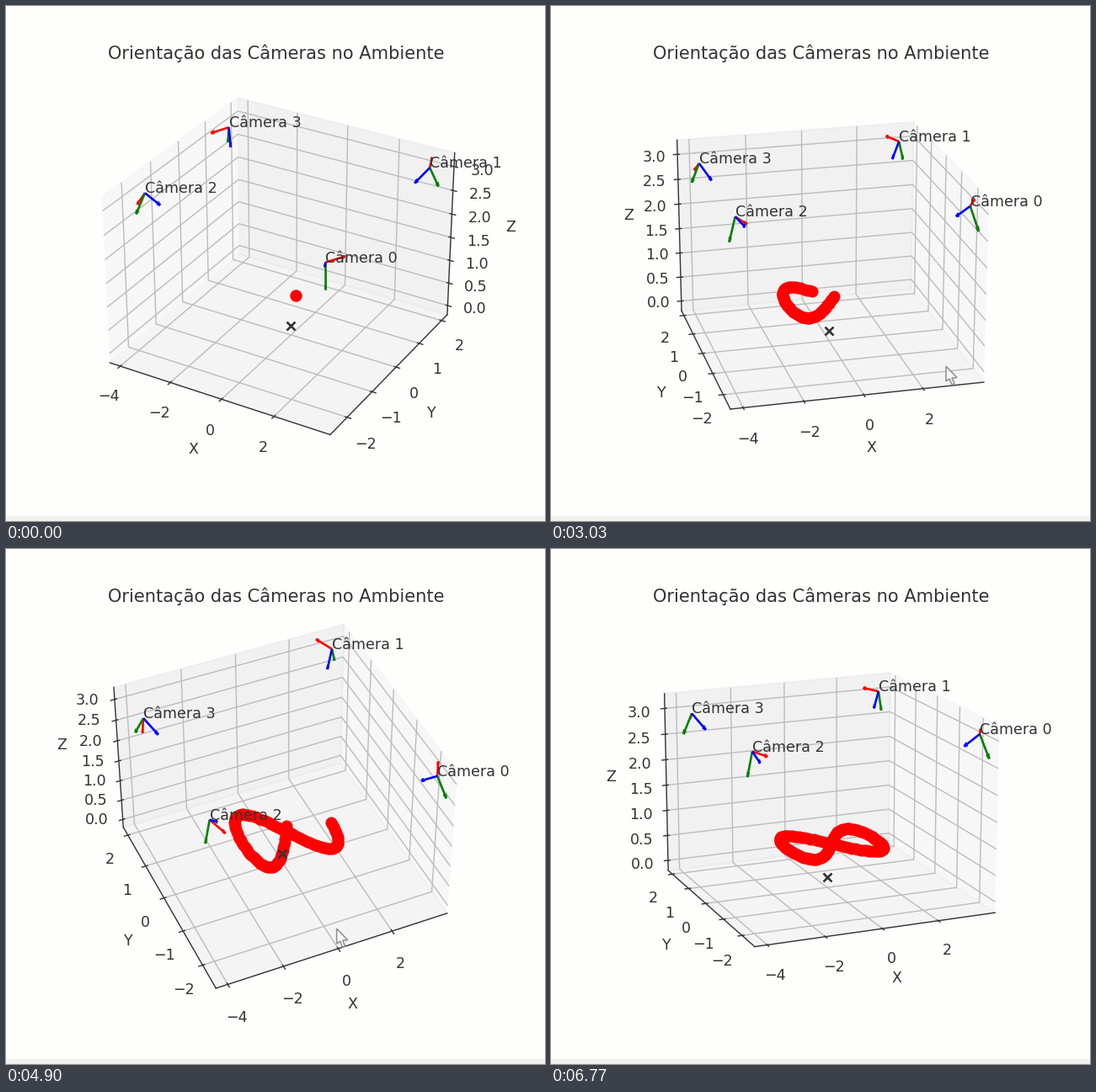
Write a matplotlib script that moves like this. It is 640 px wide and 612 px high and loops after 6810 ms.

```python
import numpy as np
import matplotlib.pyplot as plt
from matplotlib.animation import FuncAnimation
from matplotlib.patches import Polygon, Rectangle

W, H, DPI = 640, 612, 126
LOOP, STEP = 6810, 30
SIDE = 465.7
INK = "#333333"

plt.rcParams.update({
    "font.family": "DejaVu Sans",
    "grid.color": "#bcbcc0",
    "text.color": INK,
    "axes.labelcolor": INK,
    "xtick.color": INK,
    "ytick.color": INK,
    "axes.edgecolor": INK,
})

# time, elevation, azimuth, path angle, pointer x, pointer y
POSES = np.array([
    (700, 30, -60, -5, 660, 620),
    (1300, 29, -64.3, 25, 365, 452),
    (2100, 27, -82.8, 91, 408, 437),
    (3030, 21, -104.2, 162, 469, 428),
    (4470, 36.4, -131.6, 225, 437, 453),
    (5400, 46.5, -90.5, 316, 344, 445),
    (6400, 16, -112.8, 355, 660, 380),
])
TIMES, VALUES = POSES[:, 0], POSES[:, 1:]


def slopes(ts, vs):
    """Harmonic-mean slopes, flat at turning points and at both ends."""
    d = np.diff(vs, axis=0) / np.diff(ts)[:, None]
    a, b = d[:-1], d[1:]
    same = a * b > 0
    inner = np.where(same, 2 * a * b / np.where(same, a + b, 1), 0)
    return np.pad(inner, ((1, 1), (0, 0)))


SLOPES = slopes(TIMES, VALUES)


def pose(t):
    """Smooth path through the poses, held before the first and after the last."""
    i = int(np.clip(np.searchsorted(TIMES, t, "right") - 1, 0, len(TIMES) - 2))
    span = TIMES[i + 1] - TIMES[i]
    u = np.clip((t - TIMES[i]) / span, 0, 1)
    v = 1 - u
    return (v * v * ((1 + 2 * u) * VALUES[i] + u * span * SLOPES[i])
            + u * u * ((1 + 2 * v) * VALUES[i + 1] - v * span * SLOPES[i + 1]))


def eight(deg):
    """Figure eight traced by the ball at a fixed height."""
    a = np.radians(deg)
    return 0.04 - 1.6 * np.sin(a), -0.14 - 0.82 * np.sin(2 * a), np.full(a.shape, 0.69)


def camera_axes(heading, pitch=33):
    """Right, down and forward directions."""
    h, p = np.radians([heading, pitch])
    ch, sh, cp, sp = np.cos(h), np.sin(h), np.cos(p), np.sin(p)
    return (sh, -ch, 0), (-ch * sp, -sh * sp, -cp), (ch * cp, sh * cp, -sp)


def stage(points):
    """Stage pixels, y down, to figure fractions."""
    return np.array(points) / (W, -H) + (0, 1)


fig = plt.figure(figsize=(W / DPI, H / DPI), dpi=DPI, facecolor="#fefefd")
ax = fig.add_axes([88.2 / W, 73.2 / H, SIDE / W, SIDE / H],
                  projection="3d", computed_zorder=False, facecolor="none")
# 3D axes lower the title to 92 % of the given height
ax.set_title("Orientação das Câmeras no Ambiente", y=1 / 0.92)

# position and heading of each camera
cameras = [((3.6, -2.41, 3.1), 136), ((3.41, 1.98, 3.0), 213),
           ((-3.83, -1.73, 3.04), 25), ((-3.93, 1.44, 3.05), -37)]
for n, (spot, heading) in enumerate(cameras):
    for direction, color in zip(camera_axes(heading), "rgb"):
        ax.quiver(*spot, *direction, length=0.5, color=color,
                  linewidth=1.5, arrow_length_ratio=0.2, zorder=4)
    ax.text(*spot, f"Câmera {n}", zorder=6)

trail, = ax.plot([], [], [], "o", color="red", ms=8, mew=0, zorder=3)
ax.plot([0], [0], [0], "x", color=INK, ms=6, mew=1.5, zorder=5)

ax.set(xlim=(-4.42, 4.08), ylim=(-2.66, 2.26), zlim=(-0.205, 3.285),
       xticks=range(-4, 3, 2), yticks=range(-2, 3), zticks=np.arange(0, 3.1, 0.5),
       xlabel="X", ylabel="Y", zlabel="Z")

fig.add_artist(Rectangle((0, 0), 1, 6 / H, transform=fig.transFigure,
                         facecolor="#f2f2ec", edgecolor="none"))
ARROW = np.array([(0, 0), (0, 18), (4, 15), (7, 22), (10, 20.5), (7, 14), (13, 13.5)])
cursor = fig.add_artist(Polygon(stage(ARROW), closed=True, transform=fig.transFigure,
                                facecolor="#f8f8f8", edgecolor="#909090",
                                linewidth=0.9, zorder=10))


def update(i):
    elev, azim, angle, *tip = pose(i * STEP)
    ax.view_init(elev=elev, azim=azim)
    start = VALUES[0, 2]
    count = int((angle - start) / 2.5) + 2
    trail.set_data_3d(*eight(np.linspace(start, angle, count)))
    cursor.set_xy(stage(ARROW + tip))
    return trail, cursor


anim = FuncAnimation(fig, update, frames=LOOP // STEP, interval=STEP,
                     repeat=True, repeat_delay=0, blit=False)
plt.show()
```
